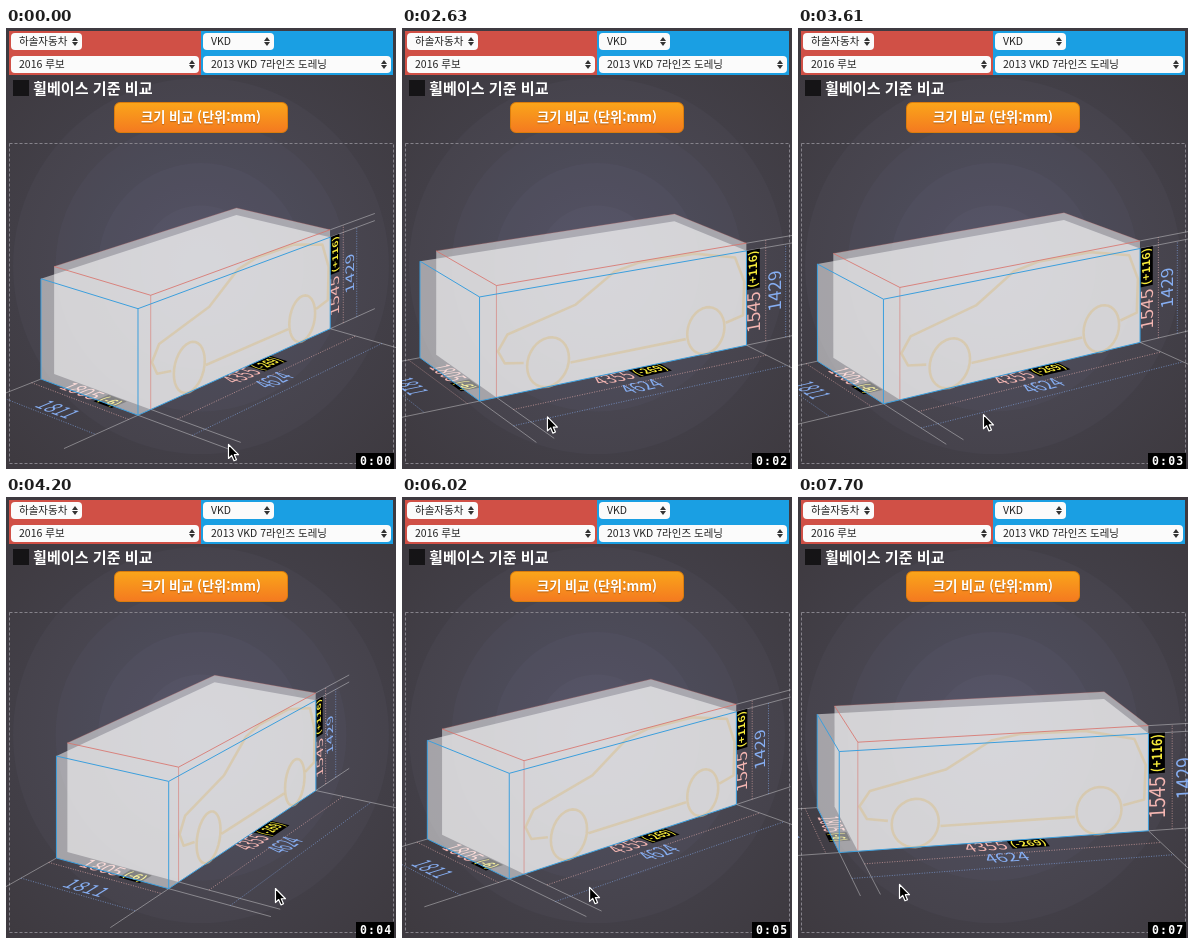
Write an HTML page with a canvas that moves like this. It is 390 px wide and 441 px high and loops after 8 s.

```html
<!DOCTYPE html>
<html lang="ko">
<head>
<meta charset="utf-8">
<title>크기 비교</title>
<style>
html, body { margin: 0; width: 100%; height: 100%; overflow: hidden; background: #3d3a3f; }
body { position: relative; font-family: "Noto Sans CJK KR", "Noto Sans CJK JP", "Noto Sans CJK", sans-serif; }
canvas { position: absolute; left: 0; top: 0; }
div { position: absolute; box-sizing: border-box; white-space: nowrap; }
.panel { top: 3px; height: 44px; width: 192px; }
.select { height: 17px; padding-left: 8px; border-radius: 4px; background: #fbfbfb;
  font-size: 10.5px; font-weight: 500; line-height: 16px; color: #222; }
.select::before, .select::after { content: ""; position: absolute; right: 4px; width: 6px; height: 4px;
  background: #333; clip-path: polygon(50% 0, 100% 100%, 0 100%); }
.select::before { top: 4px; }
.select::after { top: 9px; transform: scaleY(-1); }
.top { top: 5px; width: 71px; }
.bottom { top: 28px; width: 188px; }
.left { left: 5px; }
.right { left: 197px; }
.check { left: 7px; top: 52px; width: 16px; height: 16px; background: #151416; }
.caption { left: 27px; top: 49px; font-size: 15.1px; font-weight: 700; line-height: 20px; color: #fff; }
.button { left: 108px; top: 74px; width: 174px; height: 31px; border-radius: 6px; border: 1px solid #da7c0c;
  background: linear-gradient(#faa51a, #f47a20); color: #fff; font-size: 13.2px; font-weight: 700;
  line-height: 28px; text-align: center; text-shadow: 0 1px 1px #0004; }
</style>
</head>
<body>
<canvas id="stage" width="390" height="441"></canvas>
<div class="panel" style="left:3px;background:#d05046"></div>
<div class="panel" style="left:195px;background:#1a9fe3"></div>
<div class="select top left">하솔자동차</div>
<div class="select bottom left">2016 루보</div>
<div class="select top right">VKD</div>
<div class="select bottom right">2013 VKD 7라인즈 도레닝</div>
<div class="check"></div>
<div class="caption">휠베이스 기준 비교</div>
<div class="button">크기 비교 (단위:mm)</div>
<script>
const ctx = document.getElementById('stage').getContext('2d');
const LOOP = 8000, TIMER_SECOND = 1040;
const FONT = '"Noto Sans CJK KR", "Noto Sans CJK JP", "Noto Sans CJK", sans-serif';
const PINK = '#f4b6b2', SKY = '#86aef2', RED = '#d9716a', BLUE = '#3c9fdd', GUIDE = 'rgba(255,255,255,.36)';

// Sizes in mm; both boxes share their rear end.
const blueBox = { front: 0, width: 1811, height: 1429 };
const redBox = { front: 269, width: 1805, height: 1545 };
const REAR = 4624, SIDE = 1811;

// Pointer strokes, each easing out towards x, y; from DRAG_START on they turn the boxes.
const DRAG_START = 2310, DRAG_LAG = 85;
const strokes = [
  { from: 30, to: 230, x: 268, y: 402, power: 1.5 },
  { from: 430, to: 850, x: 262, y: 354, power: 1.5 },
  { from: 850, to: 1240, x: 293, y: 381, power: 1.5 },
  { from: 1620, to: 2110, x: 226, y: 404, power: 1.5 },
  { from: DRAG_START, to: 3110, x: 112, y: 382, power: 2.42 },
  { from: 3170, to: 4950, x: 338, y: 395, power: 1.37 },
  { from: 5170, to: 7600, x: 101, y: 387, power: 2.35 }
];
function pointerAt(t) {
  let x = 222, y = 416;
  for (const stroke of strokes) {
    if (t <= stroke.from) break;
    const u = Math.min(1, (t - stroke.from) / (stroke.to - stroke.from));
    const eased = 1 - (1 - u) ** stroke.power;
    x += (stroke.x - x) * eased;
    y += (stroke.y - y) * eased;
  }
  return { x, y };
}
// The boxes follow the pointer with a small delay.
function yawAt(t) {
  const degrees = 10.3 + 0.2835 * (pointerAt(Math.max(t - DRAG_LAG, DRAG_START)).x - 101);
  return degrees * Math.PI / 180;
}

// Perspective with an off-centre eye, so uprights stay vertical.
const SCALE = 0.0665, FOCAL = 1500;
let cos = 1, sin = 0;
function project([l, w, h]) {
  const x = (l - 2525) * SCALE, z = (w - 905) * SCALE;
  const k = FOCAL / (FOCAL + x * sin - z * cos);
  return [30 + (165 + x * cos + z * sin) * k, -225 + (546 - h * SCALE) * k];
}

function trace(points, close) {
  ctx.beginPath();
  points.forEach(p => ctx.lineTo(...project(p)));
  if (close) ctx.closePath();
}
function line(points, color, { width = 1, dash = [], close = false } = {}) {
  trace(points, close);
  ctx.setLineDash(dash);
  ctx.lineWidth = width;
  ctx.strokeStyle = color;
  ctx.stroke();
  ctx.setLineDash([]);
}
const dotted = (from, to, color) => line([from, to], color + '99', { dash: [1, 1.5] });

// Text lying in the plane spanned by the directions right and down.
function label(center, right, down, stretch, text, color, diff) {
  const step = 10 / SCALE;
  const shift = (dir, s) => project(center.map((c, i) => c + dir[i] * s));
  const axis = (dir, size) => {
    const a = shift(dir, -step), b = shift(dir, step);
    return [(b[0] - a[0]) / 20 * size, (b[1] - a[1]) / 20 * size];
  };
  ctx.save();
  ctx.transform(...axis(right, 1), ...axis(down, stretch), ...project(center));
  const mainFont = '18.6px ' + FONT, diffFont = 'bold 12px ' + FONT;
  ctx.font = mainFont;
  const mainWidth = ctx.measureText(text).width;
  ctx.font = diffFont;
  const diffWidth = diff ? ctx.measureText(diff).width + 2 : 0;
  const x = -(mainWidth + (diff ? diffWidth + 3 : 0)) / 2;
  if (diff) {
    const left = x + mainWidth + 3;
    ctx.fillStyle = '#000';
    ctx.fillRect(left, -7, diffWidth, 14);
    ctx.fillStyle = '#f6ea3a';
    ctx.fillText(diff, left + 1, 4.2);
  }
  ctx.font = mainFont;
  ctx.fillStyle = color;
  ctx.fillText(text, x, 6.8);
  ctx.restore();
}

function drawBackground() {
  const glow = ctx.createRadialGradient(195, 238, 0, 195, 238, 270);
  glow.addColorStop(0, '#4b4a57');
  glow.addColorStop(1, '#3e3a40');
  ctx.fillStyle = glow;
  ctx.fillRect(0, 0, 390, 441);
  ctx.fillStyle = 'rgba(140,145,180,.05)';
  for (let ring = 1; ring <= 4; ring++) {
    ctx.beginPath();
    ctx.arc(195, 238, 18 + 42.5 * ring, 0, 7);
    ctx.fill();
  }
  ctx.setLineDash([3, 2]);
  ctx.lineWidth = 1;
  ctx.strokeStyle = '#85828a';
  ctx.strokeRect(3.5, 115.5, 384, 320);
  ctx.setLineDash([]);
}

function drawDimensions() {
  const L = [1, 0, 0], W = [0, 1, 0], H = [0, 0, 1], FRONT = [-1, 0, 0];

  for (const w of [0, SIDE]) line([[0, w, 0], [-1450, w, 0]], GUIDE);
  dotted([-190, 0, 0], [-190, SIDE, 0], PINK);
  dotted([-850, 0, 0], [-850, SIDE, 0], SKY);
  label([90, 905, 0], W, FRONT, 1.5, '1805', PINK, '(-6)');
  label([-610, 905, 0], W, FRONT, 1.5, '1811', SKY);

  for (const l of [0, redBox.front, REAR]) line([[l, SIDE, 0], [l, SIDE + 1500, 0]], GUIDE);
  dotted([redBox.front, SIDE + 460, 0], [REAR, SIDE + 460, 0], PINK);
  dotted([0, SIDE + 920, 0], [REAR, SIDE + 920, 0], SKY);
  label([2400, SIDE + 150, 0], L, W, 1.5, '4355', PINK, '(-269)');
  label([2280, SIDE + 590, 0], L, W, 1.5, '4624', SKY);

  for (const h of [0, blueBox.height, redBox.height]) line([[REAR, SIDE, h], [REAR + 1300, SIDE, h]], GUIDE);
  dotted([REAR + 370, SIDE, 0], [REAR + 370, SIDE, redBox.height], PINK);
  dotted([REAR + 760, SIDE, 0], [REAR + 760, SIDE, blueBox.height], SKY);
  label([REAR + 130, SIDE, 800], H, L, 1.2, '1545', PINK, '(+116)');
  label([REAR + 550, SIDE, 740], H, L, 1.2, '1429', SKY);
}

function corners({ front, width, height }) {
  const far = (SIDE - width) / 2, near = SIDE - far;
  return {
    left: [front, far, 0], near: [front, near, 0], right: [REAR, near, 0],
    leftTop: [front, far, height], nearTop: [front, near, height],
    rightTop: [REAR, near, height], backTop: [REAR, far, height]
  };
}
function fillBox(c) {
  trace([c.left, c.near, c.right, c.rightTop, c.backTop, c.leftTop], true);
  ctx.fillStyle = 'rgba(255,255,255,.51)';
  ctx.fill();
}

// Side view in fractions of the red box: bumper, bonnet, roof, tail.
const profile = [[.1, .26], [.03, .29], [.005, .41], [.04, .545], [.295, .7], [.45, .945],
  [.55, .99], [.775, .985], [.95, .88], [.99, .63], [.985, .3], [.91, .26]];
function drawCar() {
  const style = { width: 2.6 }, color = 'rgba(217,195,150,.58)';
  const radius = 345, sill = .18, wheels = [.192, .825];
  const along = u => redBox.front + u * (REAR - redBox.front);
  const at = ([u, v]) => [along(u), SIDE, v * redBox.height];
  ctx.lineJoin = 'round';
  line(profile.map(at), color, style);
  line([at([wheels[0] + .085, sill]), at([wheels[1] - .085, sill])], color, style);
  for (const u of wheels) {
    const rim = Array.from({ length: 32 }, (_, i) => {
      const a = i / 16 * Math.PI;
      return [along(u) + radius * Math.cos(a), SIDE, radius + radius * Math.sin(a)];
    });
    line(rim, color, { ...style, close: true });
  }
}

function drawBoxes() {
  const red = corners(redBox), blue = corners(blueBox);
  fillBox(blue);
  fillBox(red);
  drawCar();
  line([red.leftTop, red.backTop, red.rightTop], RED + '40');
  line([red.leftTop, red.nearTop, red.rightTop], RED + 'd0');
  line([red.near, red.nearTop], RED + '90');
  line([blue.left, blue.near, blue.nearTop, blue.leftTop], BLUE, { close: true });
  line([blue.nearTop, blue.rightTop, blue.right, blue.near], BLUE);
}

function drawTimer(t) {
  ctx.fillStyle = '#000';
  ctx.fillRect(350, 425, 38, 16);
  ctx.fillStyle = '#fff';
  ctx.font = 'bold 11.5px "DejaVu Sans Mono", monospace';
  ctx.letterSpacing = '1.2px';
  ctx.fillText('0:0' + Math.floor(t / TIMER_SECOND), 354, 436.5);
  ctx.letterSpacing = '0px';
}

const arrow = new Path2D('M0 0V14L3.2 11 5.5 16.3 8 15.2 5.8 10.2H10Z');
function drawPointer({ x, y }) {
  ctx.save();
  ctx.translate(x + .5, y + .5);
  ctx.lineWidth = 1.2;
  ctx.fillStyle = '#000';
  ctx.strokeStyle = '#fff';
  ctx.fill(arrow);
  ctx.stroke(arrow);
  ctx.restore();
}

const start = performance.now();
function draw() {
  const t = (performance.now() - start) % LOOP;
  const yaw = yawAt(t);
  cos = Math.cos(yaw);
  sin = Math.sin(yaw);
  drawBackground();
  drawDimensions();
  drawBoxes();
  drawTimer(t);
  drawPointer(pointerAt(t));
  requestAnimationFrame(draw);
}
draw();
</script>
</body>
</html>
```
